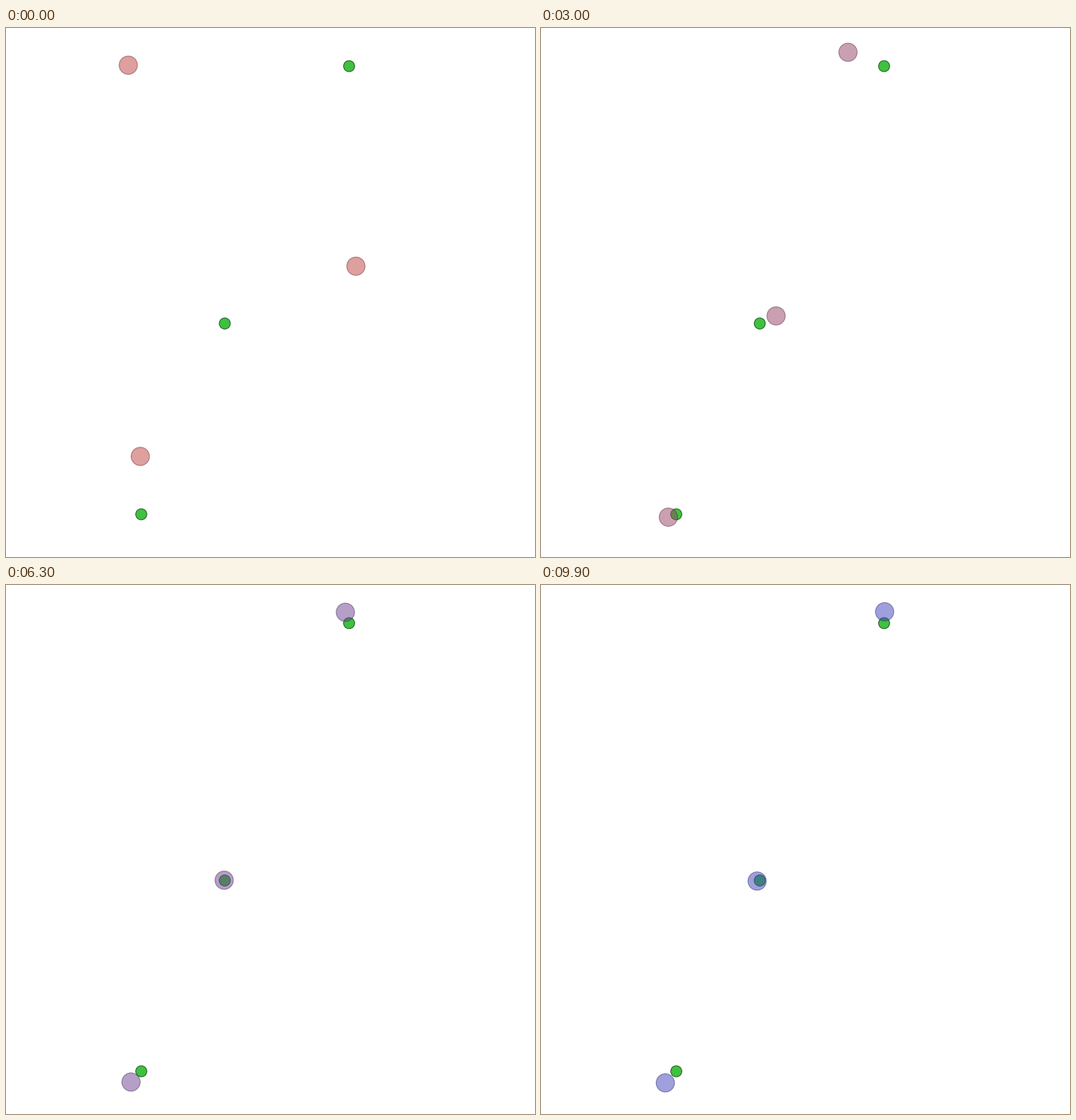
Write a matplotlib script that moves like this. It is 700 px wide and 700 px high and loops after 10 s.

```python
import numpy as np
import matplotlib.pyplot as plt
from matplotlib.animation import FuncAnimation
from matplotlib.patches import Circle

SIZE, DPI, FRAMES = 700, 100, 100
RED, BLUE = np.array([191, 64, 64]) / 255, np.array([64, 64, 191]) / 255
GREEN = np.array([64, 192, 64]) / 255


def settle(t, start, end, rate):
    """Exponential approach from start to end."""
    return end + (start - end) * np.exp(-rate * t)


def swing(t, start, end, rate, speed, phase):
    """Damped oscillation that comes to rest at end."""
    wave = np.cos(speed * t + phase) / np.cos(phase)
    return end + (start - end) * np.exp(-rate * t) * wave


def top(t):
    lag = 5 * t * np.exp(-t / 7)
    return (settle(t, 161.8, 455.4, 0.061) - lag,
            swing(t, 49.2, 35.5, 0.053, 0.0924, 0.647))


def middle(t):
    return settle(t, 463, 285.7, 0.0648), settle(t, 315.2, 391.9, 0.065)


def bottom(t):
    return settle(t, 177.7, 164.2, 0.038), settle(t, 566.9, 658.9, 0.069)


fig = plt.figure(figsize=(SIZE / DPI, SIZE / DPI), dpi=DPI, facecolor="white")
ax = fig.add_axes([0, 0, 1, 1])
ax.set(xlim=(0, SIZE), ylim=(SIZE, 0))
ax.axis("off")


def disc(center, radius, color, alpha=None):
    patch = Circle(center, radius, facecolor=color, edgecolor=color * 0.5,
                   linewidth=72 / DPI, alpha=alpha)
    return ax.add_patch(patch)


for point in [(454, 50.5), (289.5, 391), (179, 643.5)]:
    disc(point, 7.3, GREEN)

paths = [top, middle, bottom]
movers = [disc(path(0), 12.1, RED, 0.5) for path in paths]


def update(frame):
    color = RED + (BLUE - RED) * frame / (FRAMES - 1)
    for mover, path in zip(movers, paths):
        mover.center = path(frame)
        mover.set_facecolor(color)
        mover.set_edgecolor(color * 0.5)
    return movers


anim = FuncAnimation(fig, update, frames=FRAMES, interval=100,
                     repeat=True, repeat_delay=0)
plt.show()
```
